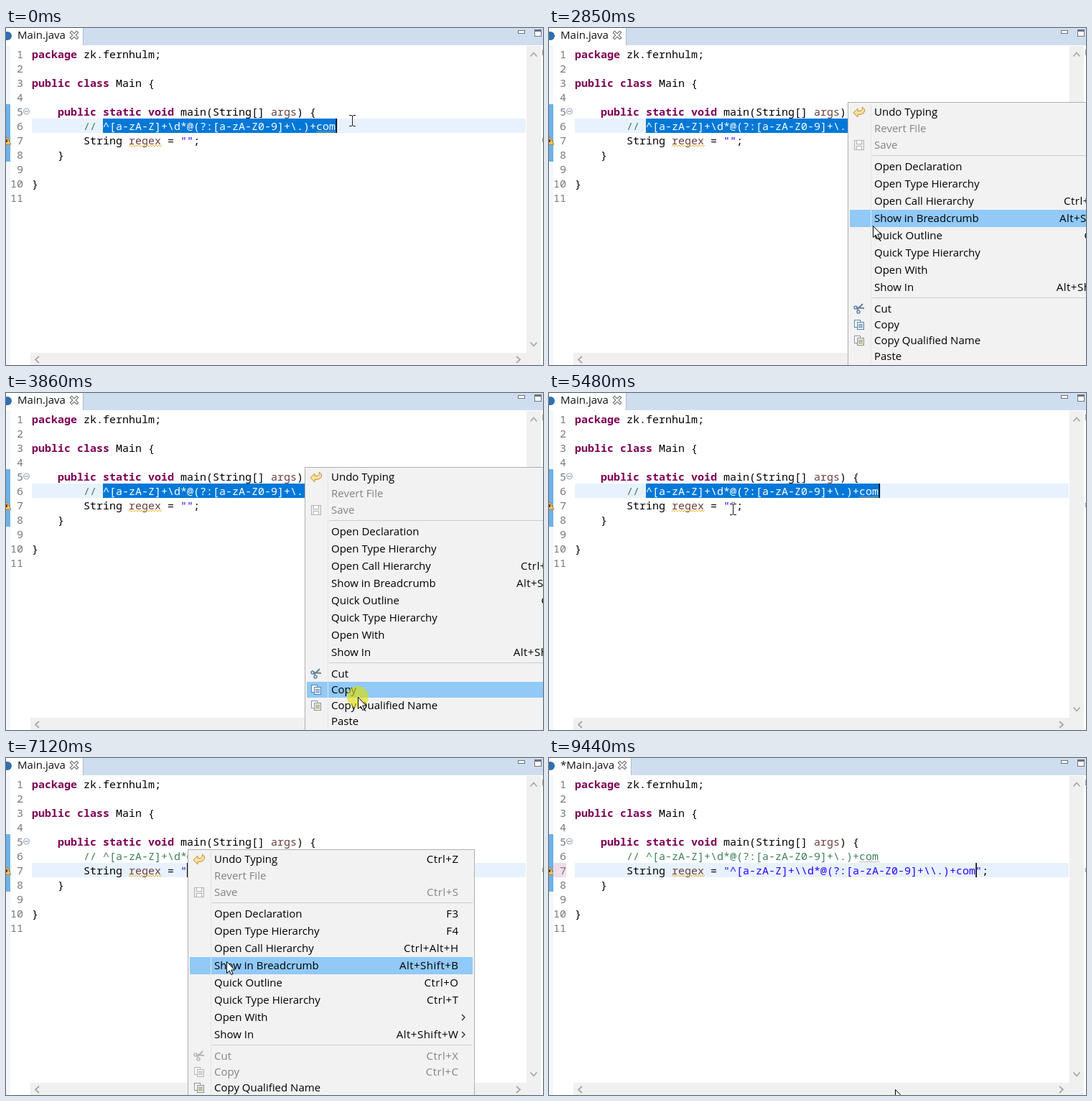
Write an HTML page that moves like this. It is 748x469 px and loops after 9840 ms.

```html
<!DOCTYPE html>
<html lang="en">
<head>
<meta charset="utf-8">
<title>Editor: copy and paste a regex</title>
<style>
  html, body { margin: 0; width: 100%; height: 100%; overflow: hidden; background: #fff; }
  svg { display: block; width: 100%; height: 100%; }
  text { white-space: pre; }
  .code { font: 15px "Noto Sans Mono", "DejaVu Sans Mono", monospace; }
  .ui { font: 15px "Open Sans", "Noto Sans", sans-serif; }
  .keys { letter-spacing: .5px; text-anchor: end; }
  .bold { font-weight: 700; }
</style>
</head>
<body>
<svg id="stage" viewBox="0 0 748 469"></svg>
<script>
const LOOP = 9840, CHAR = 9, LEFT = 36;
const stage = document.getElementById('stage');

function add(parent, tag, attrs = {}, content) {
  const node = document.createElementNS('http://www.w3.org/2000/svg', tag);
  for (const key in attrs) node.setAttribute(key, attrs[key]);
  if (content !== undefined) node.textContent = content;
  parent.appendChild(node);
  return node;
}
const rect = (p, x, y, width, height, fill, more) => add(p, 'rect', { x, y, width, height, fill, ...more });
const line = (p, d, stroke, width = 1, more) =>
  add(p, 'path', { d, stroke, 'stroke-width': width, fill: 'none', ...more });
const show = (node, on) => node.setAttribute('visibility', on ? 'visible' : 'hidden');
const moveTo = (node, x, y) => node.setAttribute('transform', `translate(${x} ${y})`);
const rowTop = n => 6 + 20 * n;

// ---- editor frame ----
const defs = add(stage, 'defs');
const hatch = add(defs, 'pattern', { id: 'hatch', width: 2, height: 2, patternUnits: 'userSpaceOnUse' });
rect(hatch, 0, 0, 2, 2, '#d9ecfa');
rect(hatch, 0, 0, 1, 1, '#0078d7');
rect(hatch, 1, 1, 1, 1, '#0078d7');

rect(stage, 0, 0, 748, 469, '#fff');
rect(stage, 0, 0, 748, 24, '#cfdeef');
const tab = rect(stage, 0, 0, 107, 24, '#fff');
const tabEdge = rect(stage, 107, 0, 1, 24, '#a9bccf');
add(stage, 'circle', { cx: 2, cy: 11, r: 6, fill: '#2f6fae' });
const title = add(stage, 'text', { class: 'ui', x: 16, y: 15, fill: '#111' });
const closer = add(stage, 'g');
const cross = 'M-3.5 -3.5L3.5 3.5M3.5 -3.5L-3.5 3.5';
line(closer, cross, '#6a6a6a', 4.2, { 'stroke-linecap': 'square' });
line(closer, cross, '#fff', 2, { 'stroke-linecap': 'square' });

rect(stage, 713.5, 3.5, 9, 4, '#fff', { stroke: '#70707a' });
rect(stage, 736.5, 2.5, 9, 9, '#fff', { stroke: '#70707a' });
rect(stage, 736, 2, 10, 3, '#70707a');

rect(stage, 0, 24, 6, 445, '#f3f7fa');
rect(stage, 725, 25, 20, 444, '#f0f0f0');
rect(stage, 34, 452, 711, 17, '#f0f0f0');
const chevrons = 'M730.5 39.5l4.5 -5l4.5 5M730.5 437.5l4.5 5l4.5 -5M46 457l-5 4.5l5 4.5M711 457l5 4.5l-5 4.5';
line(stage, chevrons, '#a8a8a8', 1.8);
rect(stage, 747, 30, 1, 8, '#9a9a9a');
rect(stage, 747, 153, 1, 6, '#9a9a9a');

rect(stage, 0, 106, 6, 80, 'url(#hatch)');
add(stage, 'path', { d: 'M1 151.500L7 162H-5Z', fill: '#f8c860', stroke: '#c07a20' });
rect(stage, 0, 155, 2, 4, '#6b3a10');

// ---- code ----
const numberMark = rect(stage, 6, 146, 18, 20, '#f0dcea');
const currentLine = rect(stage, LEFT, 126, 688, 20, '#e8f2fe');
const selection = rect(stage, 135, 126, 325, 20, '#0078d7');

for (let n = 1; n <= 11; n++)
  add(stage, 'text', { class: 'code', x: 24, y: rowTop(n) + 16, fill: '#787878', 'text-anchor': 'end' }, n);
add(stage, 'circle', { cx: 28.5, cy: 116, r: 4, fill: '#fff', stroke: '#8fa3ba' });
line(stage, 'M26 116H31', '#6d86a3');

const INK = { key: '#7f0055', plain: '#000', note: '#3f7f5f', str: '#2a00ff', name: '#6a3e3e' };
function write(n, col, kind, content) {
  return add(stage, 'text', {
    class: kind === 'key' ? 'code bold' : 'code',
    x: LEFT + col * CHAR, y: rowTop(n) + 16, fill: INK[kind]
  }, content);
}
function writeLine(n, col, ...parts) {
  for (const [kind, content] of parts) {
    write(n, col, kind, content);
    col += content.length;
  }
}
const regex = String.raw`^[a-zA-Z]+\d*@(?:[a-zA-Z0-9]+\.)+com`;
const literal = regex.replace(/\\/g, '\\\\');

writeLine(1, 0, ['key', 'package'], ['plain', ' zk.fernhulm;']);
writeLine(3, 0, ['key', 'public class'], ['plain', ' Main {']);
writeLine(5, 4, ['key', 'public static void'], ['plain', ' main(String[] '], ['name', 'args'], ['plain', ') {']);
write(6, 8, 'note', '//');
const comment = write(6, 11, 'note', regex);
writeLine(7, 8, ['plain', 'String '], ['name', 'regex'], ['plain', ' =']);
const quoted = write(7, 23, 'str', '');
const semicolon = write(7, 25, 'plain', ';');
write(8, 4, 'plain', '}');
write(10, 0, 'plain', '}');

function squiggle(x, y, width, color) {
  let d = `M${x} ${y}`;
  for (let i = 0; i * 2 < width; i++) d += `l2 ${i % 2 ? 2 : -2}`;
  line(stage, d, color);
}
squiggle(171, 165, 45, '#f0b429');
squiggle(432, 145.500, 27, '#b9a58c');
const caret = rect(stage, 0, 0, 1.6, 20, '#000');

// ---- context menu: label, keys, centre, height ----
const ROWS = [
  ['Undo Typing', 'Ctrl+Z'], ['Revert File', ''], ['Save', 'Ctrl+S'],
  ['Open Declaration', 'F3'], ['Open Type Hierarchy', 'F4'], ['Open Call Hierarchy', 'Ctrl+Alt+H'],
  ['Show in Breadcrumb', 'Alt+Shift+B'], ['Quick Outline', 'Ctrl+O'], ['Quick Type Hierarchy', 'Ctrl+T'],
  ['Open With', ''], ['Show In', 'Alt+Shift+W'],
  ['Cut', 'Ctrl+X'], ['Copy', 'Ctrl+C'], ['Copy Qualified Name', ''], ['Paste', 'Ctrl+V']
].map(([label, keys], i) => {
  const [mid, height] = i < 3 ? [14 + 23 * i, 23] : i < 11 ? [90 + 24 * (i - 3), 24] : [288 + 22 * (i - 11), 22];
  return { label, keys, mid, height, top: mid - Math.floor(height / 2) };
});

function pages(g, y, edge, fill) {
  rect(g, 9.5, y - 6.5, 8, 10, '#fff', { stroke: edge });
  rect(g, 13.5, y - 3.5, 9, 10, fill, { stroke: edge });
  line(g, `M15 ${y - .5}h6M15 ${y + 1.5}h6M15 ${y + 3.5}h6`, edge);
}

function icons(g, off) {
  const blue = off ? '#b4b4b4' : '#5b82a8';
  add(g, 'path', {
    d: 'M8 15L14 9V12.500H17Q21 12 20.500 7Q26 11 22 15.500Q20 17.500 14 17.500V21Z',
    fill: '#fbe3a0', stroke: '#c58a2b'
  });
  rect(g, 9.5, 53.5, 13, 13, '#ececec', { stroke: '#b4b4b4' });
  rect(g, 12.5, 53.5, 7, 5, '#fff', { stroke: '#b4b4b4' });
  rect(g, 12.5, 61.5, 7, 5, '#fff', { stroke: '#b4b4b4' });
  line(g, 'M21 281L13 289M23 287L12 286', off ? '#b4b4b4' : '#6b7f92', 2);
  for (const [cx, cy] of [[11, 286], [15, 292]])
    add(g, 'circle', { cx, cy, r: 2, fill: 'none', stroke: blue, 'stroke-width': 1.5 });
  pages(g, 310, blue, off ? '#f2f2f2' : '#e4f0fb');
  pages(g, 332, '#8295a5', '#fbecc0');
}

function makeMenu(x, y, disabled) {
  const g = add(stage, 'g', { transform: `translate(${x} ${y})` });
  rect(g, .5, .5, 399, 420, '#f2f2f2', { stroke: '#b0b0b0' });
  const bar = rect(g, 3, 0, 394, 24, '#91c9f7');
  rect(g, 32, 3, 1, 400, '#e6e6e6');
  for (const sep of [75, 273]) rect(g, 34, sep - 1, 363, 1, '#cdcdcd');
  icons(g, disabled.includes('Copy'));
  for (const row of ROWS) {
    const fill = disabled.includes(row.label) ? '#838383' : '#000';
    add(g, 'text', { class: 'ui', x: 37, y: row.mid + 5, fill }, row.label);
    add(g, 'text', { class: 'ui keys', x: 377.5, y: row.mid + 5, fill }, row.keys);
    if (/^(Open With|Show In)$/.test(row.label)) line(g, `M382 ${row.mid - 4}l4 4l-4 4`, '#222', 1.2);
  }
  return {
    update(on, pointerY) {
      show(g, on);
      const row = ROWS.find(r => pointerY - y >= r.top && pointerY - y < r.top + r.height);
      show(bar, on && row && !disabled.includes(row.label));
      if (row) {
        bar.setAttribute('y', row.top);
        bar.setAttribute('height', row.height);
      }
    }
  };
}
const copyMenu = makeMenu(416, 103, ['Revert File', 'Save']);
const pasteMenu = makeMenu(253, 127, ['Revert File', 'Save', 'Cut', 'Copy']);

// ---- pointer ----
const click = add(stage, 'circle', { r: 15, fill: '#e0e000', opacity: .62 });
const arrow = add(stage, 'path', {
  d: 'M.5 .5V16.500L4.200 13L6.800 18.500L9.200 17.500L6.700 12H11.500Z', fill: '#fff', stroke: '#000'
});
const beam = add(stage, 'g');
const beamShape = 'M-4 -7.500H-1L.5 -6.500L2 -7.500H5M.5 -6.500V6.500M-4 7.500H-1L.5 6.500L2 7.500H5';
line(beam, beamShape, '#fff', 2.6, { opacity: .8 });
line(beam, beamShape, '#111');

const linear = u => u;
const easeIn = u => u ** 1.8;
const easeOut = u => 1 - (1 - u) ** 2;
const easeBoth = u => (1 - Math.cos(Math.PI * u)) / 2;

// first change, last change, steps, x, y, easing
const MOVES = [
  [760, 920, 3, 456, 131], [1070, 1230, 3, 420, 135], [1610, 1610, 1, 416, 134],
  [2620, 2850, 4, 451, 275], [2926, 3460, 8, 490, 423, easeOut],
  [4410, 5330, 13, 244, 166, easeBoth], [5410, 5480, 2, 256, 162], [5560, 5560, 1, 253, 160],
  [6730, 7120, 6, 307, 283, easeIn], [7195, 7420, 4, 376, 446],
  [7590, 7590, 1, 377, 447], [7670, 7670, 1, 368, 479],
  [9120, 9120, 1, 480, 464], [9200, 9200, 1, 481, 461], [9440, 9440, 1, 482, 461]
];
const CLICKS = [[1610, 1690], [3860, 4090], [5560, 5790], [6110, 6260], [8050, 8200]];

function pointerAt(t) {
  let x = 482, y = 129;
  for (const [first, last, steps, toX, toY, ease = linear] of MOVES) {
    if (t < first) break;
    const gap = steps > 1 ? (last - first) / (steps - 1) : 1;
    const done = Math.min(steps, Math.floor((t - first) / gap + .001) + 1);
    const u = ease(done / steps);
    x += (toX - x) * u;
    y += (toY - y) * u;
  }
  return [Math.round(x), Math.round(y)];
}

function draw(t) {
  const within = (a, b) => t >= a && t < b;
  const [x, y] = pointerAt(t);
  const selected = t < 5560, pasted = t >= 8200;

  title.textContent = pasted ? '*Main.java' : 'Main.java';
  const edge = pasted ? 114 : 107;
  tab.setAttribute('width', edge);
  tabEdge.setAttribute('x', edge);
  moveTo(closer, edge - 12, 10);

  show(numberMark, pasted);
  show(selection, selected);
  currentLine.setAttribute('y', rowTop(selected ? 6 : 7));
  comment.setAttribute('fill', selected ? '#fff' : INK.note);
  const value = pasted ? literal : '';
  quoted.textContent = `"${value}"`;
  semicolon.setAttribute('x', LEFT + (25 + value.length) * CHAR);

  moveTo(caret, selected ? 459.500 : pasted ? 594.300 : 252, rowTop(selected ? 6 : 7));
  show(caret, !within(8660, 9370));

  copyMenu.update(within(1840, 4090), y);
  pasteMenu.update(within(6350, 8200), y);

  const inText = t < 1610 || within(4090, 6350);
  show(beam, inText);
  show(arrow, !inText);
  moveTo(beam, x, y);
  moveTo(arrow, x, y);
  moveTo(click, x, y);
  show(click, CLICKS.some(([a, b]) => within(a, b)));
}

const start = performance.now();
function tick(now) {
  draw(Math.max(0, now - start) % LOOP);
  requestAnimationFrame(tick);
}
draw(0);
requestAnimationFrame(tick);
</script>
</body>
</html>
```
